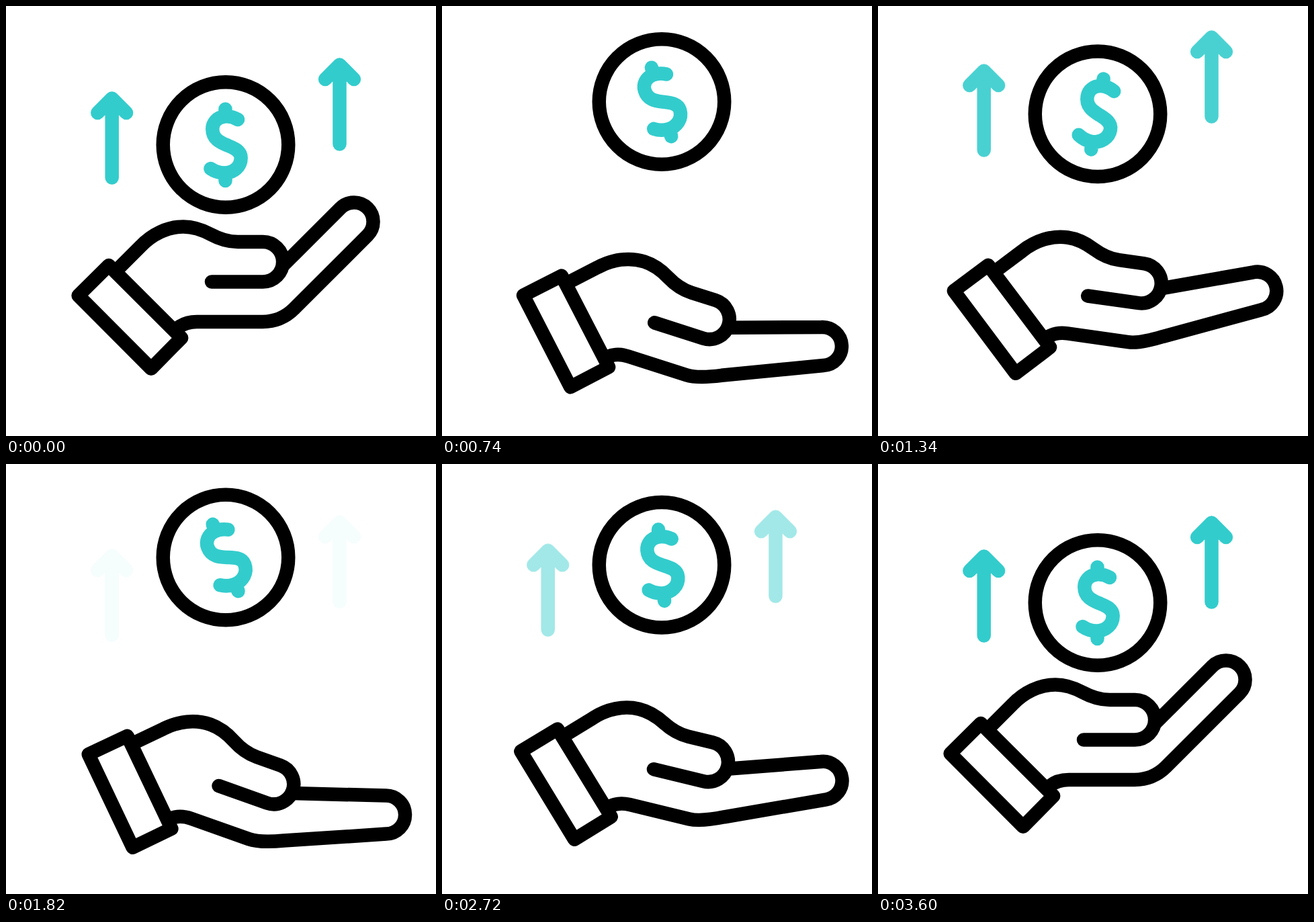
Write an HTML page without scripts that moves like this. It is 640 by 640 pixels and loops after 3.62 s.

```html
<!DOCTYPE html>
<html lang="en">
<head>
<meta charset="utf-8">
<title>Growing income</title>
<style>
  @property --tick { syntax: "<number>"; inherits: true; initial-value: 0; }
  @property --bend { syntax: "<number>"; inherits: true; initial-value: 0; }
  @property --swing { syntax: "<number>"; inherits: true; initial-value: 0; }

  html, body { margin: 0; width: 100%; height: 100%; overflow: hidden; background: #fff; }
  svg {
    --ease: cubic-bezier(.333, 0, .667, 1);
    display: block; width: 100%; height: 100%;
    fill: none; stroke: #000; stroke-width: 20.5;
    stroke-linecap: round; stroke-linejoin: round;
    animation: clock 3.62s linear infinite, pose 3.62s var(--ease) infinite;
  }
  .teal { stroke: #33cccc; }

  /* time in ticks of 20 ms */
  @keyframes clock { to { --tick: 181; } }

  /* bend: away from rest; swing: hand down and coin up */
  @keyframes pose {
    0%, 99.45%, 100% { --bend: 0; --swing: 0; }
    16.57%, 49.72%, 82.87% { --bend: 1; --swing: 1; }
    33.15%, 66.3% { --bend: 1; --swing: 0; }
  }

  .coin { transform: translateY(calc(-42.2px * var(--bend) - 25.3px * var(--swing))); }
  .dollar {
    transform-origin: 327px 206.5px;
    transform: rotate(calc(15deg * var(--bend) - 36deg * var(--swing)));
  }
  .hand {
    transform-origin: 184.5px 463px;
    transform: translateY(calc(25px * var(--swing)))
      rotate(calc(6.2deg * var(--bend) + 13.4deg * var(--swing)));
  }

  .finger {
    d: path("M256 479Q267 470 284 470H382Q409.4 470 428.8 450.6L538.2 341.2A1 1 0 0 0 497.8 300.8L413 385.6");
    animation: straighten 3.62s var(--ease) infinite;
  }
  @keyframes straighten {
    16.57%, 82.87% {
      d: path("M256 479Q267 470 284 470H375Q392 470 425 454.7L565 394.4A1 1 0 0 0 545 341L413 384");
    }
    99.45% {
      d: path("M256 479Q267 470 284 470H382Q409.4 470 428.8 450.6L538.2 341.2A1 1 0 0 0 497.8 300.8L413 385.6");
    }
  }

  /* each pair rises for 30 ticks, fading in and out on the way */
  .rise {
    --up: clamp(0, (var(--tick) - var(--start)) / 30, 1);
    --show: calc(2 * min(var(--up), 1 - var(--up)));
    transform: translateY(calc(-63px * var(--up) * var(--up) * (3 - 2 * var(--up))));
    opacity: calc(var(--show) * var(--show) * (3 - 2 * var(--show)));
  }
  /* this pair is also the resting one, back for the end of the loop */
  .resting {
    --up: clamp(0, min((var(--tick) - 9) / 30, 165 - var(--tick)), 1);
    --show: clamp(0, max(35 - var(--tick), var(--tick) - 165) / 15, 1);
  }
</style>
</head>
<body>
<svg viewBox="0 0 640 640">
  <defs>
    <path id="arrow" d="M-21.4 21.4L0 0L21.4 21.4M0 0V118"/>
    <g id="pair">
      <use href="#arrow" x="157.7" y="137.6"/>
      <use href="#arrow" x="496.5" y="87.6"/>
    </g>
  </defs>

  <g class="teal">
    <use href="#pair" class="rise resting"/>
    <use href="#pair" class="rise" style="--start: 49"/>
    <use href="#pair" class="rise" style="--start: 89"/>
    <use href="#pair" class="rise" style="--start: 129"/>
  </g>

  <g class="coin">
    <circle cx="327" cy="206.5" r="93.25"/>
    <path class="dollar teal" d="M345 169C338 165 330 164 325 164.5C314 165.5 307.3 174 307.3 183C307.3 198 319 203 328.5 207S349.7 215 349.7 226C349.7 239 339 248.5 325 248.5Q314 248.5 304.5 242M326.5 153.5V163M326.5 250V260"/>
  </g>

  <g class="hand">
    <path d="M153 386L107.6 431L216 539.7L261.2 494Z"/>
    <path d="M163 395L200 358C217 340 240 328.5 264 328.5C278 328.5 292 333 305 340C317 346.5 331 351 345 351H382.4A29.7 29.7 0 0 1 382.4 410.4H306"/>
    <path class="finger"/>
  </g>
</svg>
</body>
</html>
```
